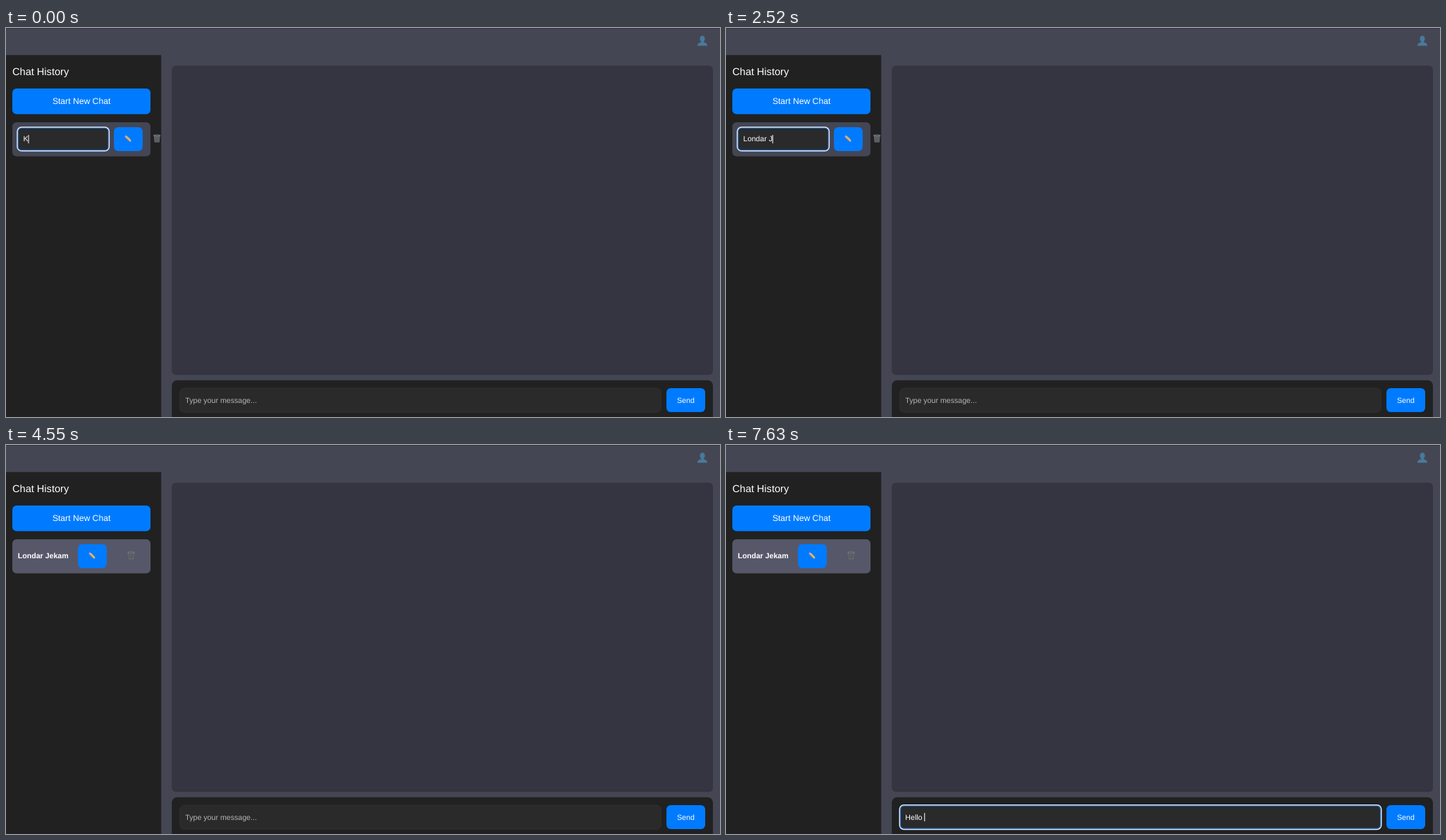
These frames come from a looping animation (1013x553 px, 8 s). An HTML page:

```html
<!DOCTYPE html>
<html lang="en">
<head>
<meta charset="utf-8">
<title>Chat rename</title>
<style>
  html, body { margin: 0; width: 100%; height: 100%; overflow: hidden; background: #444654; }
  svg { display: block; width: 1013px; height: 553px; }
  text {
    font: 10.64px "Liberation Sans", Arial, sans-serif;
    fill: #fff;
    white-space: pre;
    text-rendering: geometricPrecision;
  }
  .title { font-size: 14.59px; }
  .big { font-size: 12.16px; }
  .bold { font-weight: bold; }
  .mid { text-anchor: middle; }
  .dark { fill: #212121; }
  .blue { fill: #007bff; }
  .field { fill: #2a2a2a; stroke: #343538; stroke-width: .8; }
  .ring { fill: none; stroke: #d9eaff; stroke-width: 1.5; }
  .glow { fill: none; stroke: #1762b8; stroke-width: 1.2; }
</style>
</head>
<body>
<svg viewBox="0 0 1013 553">
  <defs>
    <g id="pencil" transform="rotate(45)">
      <rect x="-6.2" y="-1.5" width="2.2" height="3" rx=".9" fill="#e88e98"/>
      <rect x="-4.2" y="-1.5" width="1.2" height="3" fill="#c3cad0"/>
      <rect x="-3" y="-1.5" width="6" height="3" fill="#f5a32f"/>
      <rect x="-3" y="-1.5" width="6" height="1" fill="#ffc65c"/>
      <path d="M3-1.5 6.2 0 3 1.5Z" fill="#e8c99b"/>
      <path d="M5.1-.5 6.2 0 5.1.5Z" fill="#333"/>
    </g>
    <g id="trash">
      <path d="M-4.6-4.6H4.6L3.5 5.2H-3.5Z" fill="#686b70"/>
      <path d="M-2.4-3.5-1.8 4.5M0-3.5V4.5M2.4-3.5 1.8 4.5M-4-1H4M-3.7 2H3.7" stroke="#4b4d53" stroke-width=".6"/>
      <ellipse cy="-4.6" rx="5" ry="1.1" fill="#85888c"/>
      <ellipse cy="-4.5" rx="3.8" ry=".5" fill="#44464b"/>
    </g>
  </defs>

  <rect width="1013" height="553" fill="#444654"/>
  <rect width="1013" height="1" fill="#343540"/>
  <g fill="#487a9b">
    <ellipse cx="988" cy="15.2" rx="3.5" ry="4.2"/>
    <path d="M981 25.2C981 21.5 984 20.8 986.3 20V18H989.7V20C992 20.8 995 21.5 995 25.2Z"/>
  </g>

  <rect class="dark" y="38.5" width="220.2" height="514.5"/>
  <text class="title" x="9" y="67.2">Chat History</text>
  <rect class="blue" x="9" y="86" width="196" height="36.4" rx="6"/>
  <text class="big mid" x="107.1" y="108.2">Start New Chat</text>

  <rect id="row" x="9" y="134" width="196" height="48.6" rx="6"/>
  <g id="editor">
    <rect class="field" x="16.5" y="141.5" width="129.5" height="32.8" rx="5.5"/>
    <rect class="glow" x="17.3" y="142.4" width="127.8" height="31" rx="4.6"/>
    <rect class="ring" x="16" y="141.1" width="130.4" height="33.6" rx="6"/>
    <text id="draft" x="24.6" y="161.3" xml:space="preserve"></text>
  </g>
  <text id="label" class="bold" x="16.7" y="161.3"></text>
  <g id="edit">
    <rect class="blue" x="-20.4" y="-16.6" width="40.8" height="34" rx="6"/>
    <use href="#pencil"/>
  </g>
  <use id="bin" href="#trash"/>

  <rect x="235.2" y="53.5" width="767.8" height="439.7" rx="6" fill="#343541"/>
  <rect class="dark" x="235.2" y="500.8" width="767.8" height="70" rx="7.6"/>
  <rect class="field" x="246.7" y="512.2" width="682.6" height="34" rx="6"/>
  <g id="focus">
    <rect class="glow" x="247.7" y="513.1" width="680.6" height="32" rx="4.8"/>
    <rect class="ring" x="246.3" y="511.8" width="683.4" height="34.6" rx="6"/>
  </g>
  <text id="hint" x="254.3" y="532.6" style="fill:#b4b4b4">Type your message...</text>
  <text id="message" x="254.3" y="532.6" xml:space="preserve"></text>
  <rect class="blue" x="937" y="512" width="55" height="34" rx="6"/>
  <text class="mid" x="964.4" y="532.6">Send</text>
  <rect id="caret" width="1" height="12" fill="#fff"/>
</svg>
<script>
const LOOP = 8000;
const el = Object.fromEntries([...document.querySelectorAll('[id]')].map(n => [n.id, n]));

// One entry per character, evenly spaced.
const typing = (start, gap, key, base, chars) =>
  [...chars].map((_, i) => [start + i * gap, { [key]: base + chars.slice(0, i + 1), caret: true }]);

// Each step is merged into the state at its time.
const steps = [
  [0, { draft: 'K', label: '', message: '', caret: true, focus: false, row: '#444654', edit: 173.5, bin: 214.2 }],
  [70, { draft: '' }],
  [280, { draft: 'L' }],
  [770, { caret: false }],
  ...typing(910, 140, 'draft', 'L', 'ondar '),
  [1890, { draft: 'Londar H' }],
  [2310, { draft: 'Londar ' }],
  ...typing(2520, 210, 'draft', 'Londar ', 'Je'),
  ...typing(3290, 140, 'draft', 'Londar Je', 'kam'),
  [3920, { label: 'Quimel Bot', caret: false, edit: 114.9, bin: 177.5 }],
  [4340, { row: '#454755' }],
  [4410, { label: 'Londar Jekam', edit: 122.5 }],
  [4550, { row: '#565869' }],
  [5180, { focus: true, caret: true }],
  [5740, { caret: false }],
  ...typing(5880, 140, 'message', '', 'Hello '),
  [7070, { caret: false }],
  [7630, { caret: true }]
];

const show = (node, on) => node.style.display = on ? '' : 'none';

function render(time) {
  const s = Object.assign({}, ...steps.filter(([at]) => at <= time).map(([, patch]) => patch));
  for (const key of ['draft', 'label', 'message']) el[key].textContent = s[key];
  show(el.editor, !s.label);
  show(el.focus, s.focus);
  show(el.hint, !s.message);
  show(el.caret, s.caret);
  el.row.setAttribute('fill', s.row);
  el.edit.setAttribute('transform', `translate(${s.edit} 157.6)`);
  el.bin.setAttribute('transform', `translate(${s.bin} 157.2)`);

  const input = s.focus ? el.message : el.draft;
  const width = input.textContent ? input.getComputedTextLength() : 0;
  el.caret.setAttribute('x', +input.getAttribute('x') + width - .2);
  el.caret.setAttribute('y', s.focus ? 523 : 152);
}

const origin = performance.now();
let last = -1;
function tick() {
  const time = (performance.now() - origin) % LOOP;
  const index = steps.filter(([at]) => at <= time).length;
  if (index !== last) {
    render(time);
    last = index;
  }
  requestAnimationFrame(tick);
}
tick();
</script>
</body>
</html>
```
